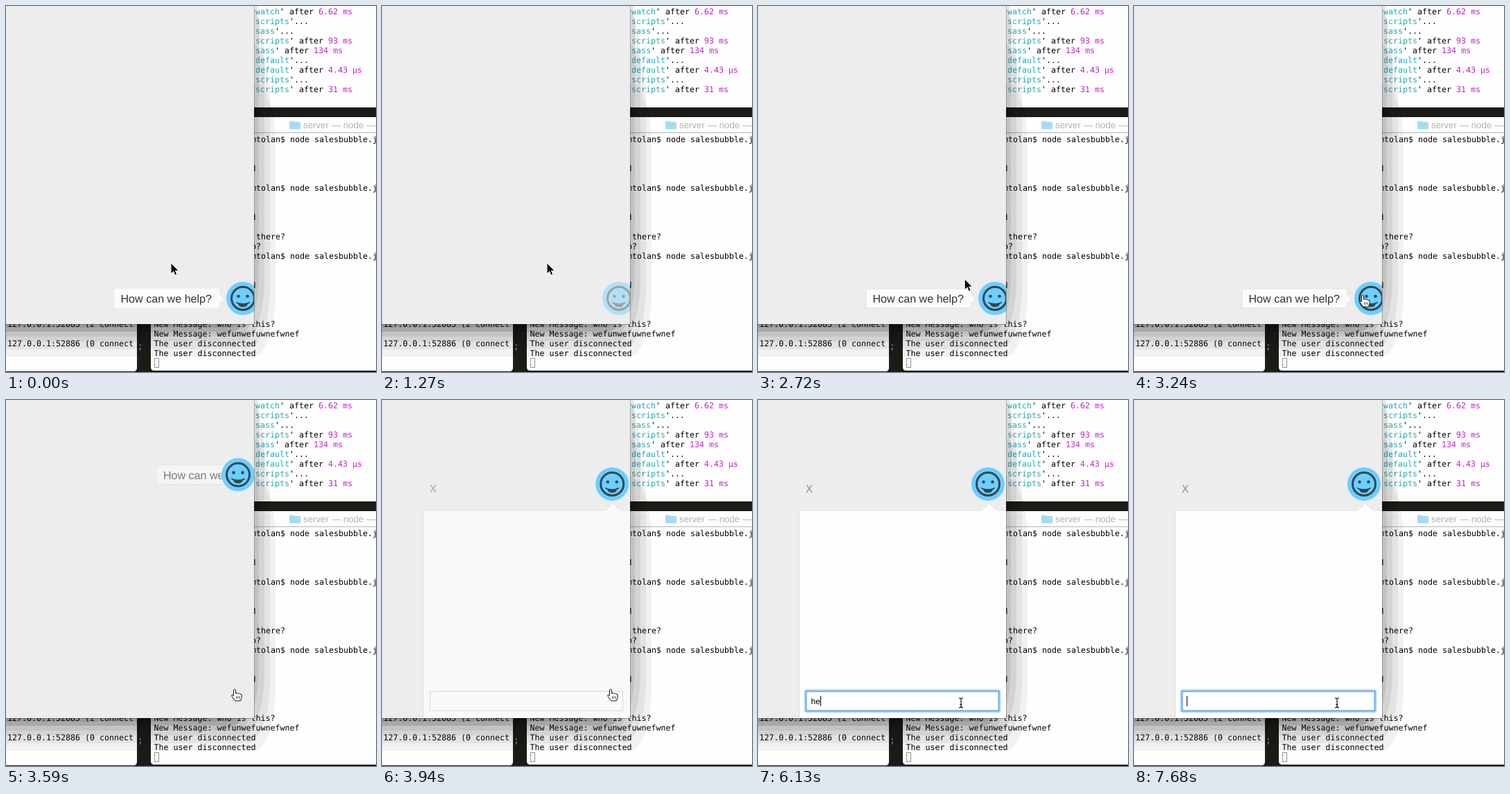
Animation of 534 by 527 pixels, one loop 8000 ms. Source, as an HTML page:

```html
<!DOCTYPE html>
<html lang="en">
<head>
<meta charset="utf-8">
<style>
  html, body { margin: 0; width: 100%; height: 100%; overflow: hidden; background: #1c1c17; }
  svg { display: block; width: 534px; height: 527px; }
  text { font-family: "Liberation Sans", Arial, sans-serif; text-rendering: geometricPrecision; white-space: pre; }
  .mono text { font: 11.63px "DejaVu Sans Mono", monospace; }
</style>
</head>
<body>
<svg viewBox="0 0 534 527">
  <defs><clipPath id="pane"><path d="M0 0H358V458H0z"/></clipPath></defs>

  <rect width="534" height="527" fill="#1c1c17"/>
  <path d="M340 0H534V146H340z" fill="#fefefe"/>
  <path d="M0 400H189V521Q189 526 184 526H0z" fill="#fefefe"/>
  <path d="M209 160H534V525H214Q209 525 209 520z" fill="#fefefe"/>
  <path d="M209 182.5H534" stroke="#b8b8b8"/>
  <path d="M409 167q0-1.500 1.500-1.500h4.500l1.500 1.500h7q1.500 0 1.500 1.500v7.500q0 1.500-1.500 1.500h-13q-1.500 0-1.500-1.500z" fill="#a5dcf2"/>
  <text x="429" y="176" font-size="13.3" fill="#b2b2b2">server — node —</text>
  <text x="190" y="494" font-size="13" fill="#96968e" style="font-family:'DejaVu Sans Mono',monospace">;</text>
  <g class="mono" id="term"></g>
  <rect x="214.500" y="507.500" width="6" height="13" fill="none" stroke="#909090"/>
  <g id="shadow"></g>

  <path d="M0 0H358V458H0z" fill="#ededed"/>
  <path d="M358.500 0V458.500H0" fill="none" stroke="#000" stroke-opacity=".25"/>
  <g clip-path="url(#pane)">
    <g id="panel">
      <path d="M59.500 470V161q0-2 2-2H322.500L333.500 149 344.500 159H370V470z" fill="#fefefe" stroke="#dedede"/>
      <text x="69" y="133" font-size="20" fill="#999">x</text>
      <rect id="halo" x="68.500" y="418.500" width="280" height="30" rx="2" fill="none" stroke="#b9d9fa" stroke-width="4"/>
      <rect id="field" x="69.500" y="419.500" width="278" height="28" fill="#fff"/>
      <text id="typed" x="76.500" y="438" font-size="12"></text>
      <path id="caret" d="M.5 426V441" stroke="#000"/>
    </g>
    <g id="label">
      <path id="bubble" d="M159 407H305q3 0 3 3V415.500L314.500 421.500 308 427.500V432q0 3-3 3H159q-3 0-3-3V410q0-3 3-3z" fill="#fbfbfb"/>
      <text x="165.500" y="427" font-size="16.100" fill="#333">How can we help?</text>
    </g>
    <g id="face">
      <circle r="24" fill="#6ccfff"/>
      <g fill="#34464f">
        <circle r="16.500" fill="none" stroke="#34464f" stroke-width="3"/>
        <circle cx="-6.500" cy="-3" r="2.300"/><circle cx="6.500" cy="-3" r="2.300"/>
        <path d="M-9.500 5Q0 9.500 9.500 5L10 6.500 7 8Q5.500 12.500 0 12.500T-7 8L-10 6.500z"/>
      </g>
    </g>
  </g>

  <g id="arrow"><path d="M0 0V15.500L3.700 12.200 6 17.600 8.700 16.400 6.400 11.200H11.200z" fill="#000" stroke="#fff"/></g>
  <g id="hand"><path d="M-1.500 1.500Q0-.8 1.500 1.500V6.500Q3.500 5 4.700 6.800 6.500 5.700 7.500 7.500 9.700 6.800 10 9V12.500L8.500 17H.5L-4 10.500Q-4.800 8.500-3 8.500L-1.500 10z" fill="#fff" stroke="#111"/><path d="M2.500 10.500v3.500M4.800 10.500v3.500M7 10.500v3.500" stroke="#111" stroke-width=".8"/></g>
  <g id="beam"><path d="M-3-7Q0-7 0-5 0-7 3-7M0-5V5M-3 7Q0 7 0 5 0 7 3 7M-1.500 2.500H1.500" fill="none" stroke="#000" stroke-width="1.100"/></g>
</svg>
<script>
const $ = id => document.getElementById(id);
const LOOP = 8000;

function line(x, y, ...parts) {
  $('term').innerHTML += `<text x="${x}" y="${y + 4}">` +
    parts.map(([s, color = '#000']) => `<tspan fill="${color}">${s}</tspan>`).join('') + '</text>';
}

const CYAN = '#27a9b5', PINK = '#c322c3';
[['watch', '6.62 ms'], ['scripts'], ['sass'], ['scripts', '93 ms'], ['sass', '134 ms'],
 ['default'], ['default', '4.43 µs'], ['scripts'], ['scripts', '31 ms']]
  .forEach(([task, time], i) => line(360, 8 + 14 * i, [task, CYAN],
    ...(time ? [["' after "], [time, PINK]] : [["'..."]])));
[192, 262, 360].forEach(y => line(354, y, ['mtolan$ node salesbubble.js']));
[234, 304, 402, 486, 500].forEach(y => line(213.5, y, ['The user disconnected']));
line(361, 332, ['there?']);
line(354, 346, ['o?']);
line(213.5, 458, ['New Message: who is this?']);
line(213.5, 472, ['New Message: wefunwefuwnefwnef']);
line(2, 458, ['127.0.0.1:52885 (2 connect']);
line(2, 486, ['127.0.0.1:52886 (0 connect']);

// stepped window shadow: right, bottom, top, opacity
[[389, 505, 110, .05], [381, 494, 50, .06], [373, 483, -10, .07], [365, 476, -70, .08],
 [358, 469, -90, .14], [357, 463, -90, .1]].forEach(([r, b, top, a]) =>
  $('shadow').innerHTML += `<rect x="-60" y="${top}" width="${r + 60}" height="${b - top}" rx="32" ry="90" opacity="${a}"/>`);

const ramp = (t, a, b) => Math.min(1, Math.max(0, (t - a) / (b - a)));
const move = (id, x, y) => $(id).setAttribute('transform', `translate(${x} ${y})`);
const fade = (id, a) => $(id).setAttribute('opacity', a);

function spring(s) {
  const w = .0196, d = .0194;
  return 1 - Math.exp(-d * s) * (Math.cos(w * s) + d / w * Math.sin(w * s));
}

function drawPointer(t) {
  const p = 1 - ramp(t, 2540, 3240);
  let x = 238 + 92 * (1 - p ** 3.55), y = 370 + 46 * (1 - p ** 2.33);
  let kind = Math.hypot(x - 342, y - 421) < 24 ? 'hand' : 'arrow';
  if (t >= 4710) {
    const q = ramp(t, 4660, 4880), e = q * (2 - q);
    kind = 'beam';
    x = 330 - 37 * e;
    y = 422 + 14 * e;
  }
  for (const id of ['arrow', 'hand', 'beam']) fade(id, +(id === kind));
  move(kind, x, y);
}

function drawChat(t) {
  const s = Math.max(0, t - 3430);
  const x = 342 - 10 * (1 - Math.exp(-s / 133)), y = 421 - 300 * spring(s);
  move('face', x, y);
  fade('face', t < 980 ? 1 : ramp(t, 1095, 1490));
  move('label', x - 342 + .425 * s, y - 421);
  fade('label', t < 980 ? 1 : ramp(t, 2040, 2310) * (1 - ramp(s, 0, 420)));
  $('bubble').setAttribute('stroke', t < 980 ? 'none' : '#e0e0e0');
  fade('panel', ramp(t, 3600, 4050));
}

function drawField(t) {
  const focus = t >= 5300;
  fade('halo', +focus);
  $('field').setAttribute('stroke', focus ? '#69a9ee' : '#d2d2d2');
  $('field').setAttribute('stroke-width', focus ? 2 : 1);
  let text = '';
  if (t >= 6010 && t < 7680) text = 'hello'.slice(0, 1 + Math.floor((t - 6010) / 120));
  if (t >= 7330 && t < 7680) text += '?';
  $('typed').textContent = text;
  const blink = t >= 5770 && t < 6010 || t >= 7030 && t < 7330;
  fade('caret', +(focus && !blink));
  move('caret', 76 + Math.round(text ? $('typed').getComputedTextLength() + .5 : 0), 0);
}

const start = performance.now();
function frame() {
  const t = (performance.now() - start) % LOOP;
  drawPointer(t);
  drawChat(t);
  drawField(t);
  requestAnimationFrame(frame);
}
frame();
</script>
</body>
</html>
```
